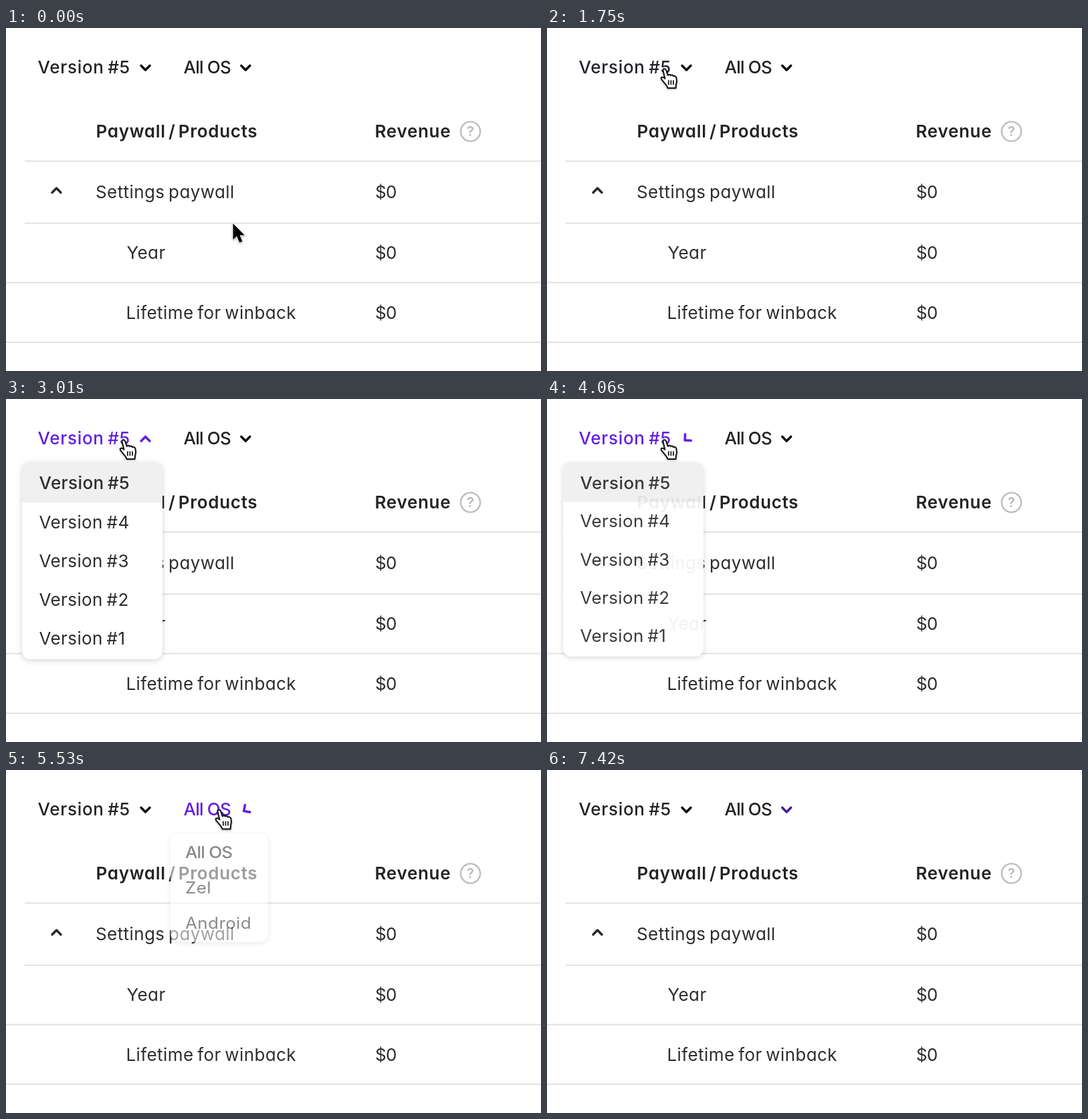
These frames come from a looping animation (800 by 514 pixels, 7.49 s). An HTML page:

```html
<!DOCTYPE html>
<html lang="en">
<head>
<meta charset="utf-8">
<title>Paywall filters</title>
<style>
  html, body { margin: 0; width: 100%; height: 100%; overflow: hidden; background: #fff; }
  svg { display: block; width: 100%; height: 100%; }
  text {
    font: 400 26px Inter, "Open Sans", sans-serif; font-feature-settings: "cv11";
    letter-spacing: .4px; word-spacing: -2px; fill: #2d2d2d; white-space: pre;
  }
  .medium { font-weight: 500; }
  .head { font-weight: 600; fill: #232323; word-spacing: -3px; }
  .title { letter-spacing: .7px; }
  .tight { letter-spacing: -.8px; word-spacing: 0; }
  .rule { stroke: #e2e2e2; stroke-width: 1.8; }
  .chevron { fill: none; stroke: #111; stroke-width: 3.6; stroke-linecap: round; stroke-linejoin: round; }
  .panel { fill: #fff; filter: drop-shadow(0 2px 4px rgba(0, 0, 0, .17)); }
  .cursor { filter: drop-shadow(0 1.5px 1.5px rgba(0, 0, 0, .35)); }
</style>
</head>
<body>
<svg id="stage" viewBox="0 0 800 514"></svg>
<script>
const NS = "http://www.w3.org/2000/svg";
const LOOP = 7490, STEP = 70, HOLD = 280;
const DARK = [34, 34, 34], BLACK = [14, 14, 14], PURPLE = [98, 32, 224];
const ROW = 58.2, MENU_TOP = 95, PAD = 2;
const stage = document.getElementById("stage");

function add(tag, attrs = {}, parent = stage) {
  const node = document.createElementNS(NS, tag);
  for (const key in attrs) node.setAttribute(key, attrs[key]);
  parent.append(node);
  return node;
}

function label(str, x, y, cls = "", parent = stage) {
  const node = add("text", { x, y, class: cls }, parent);
  node.textContent = str;
  return node;
}

const rule = (x, y) => add("line", { x1: x, x2: 800, y1: y, y2: y, class: "rule" });
const chevron = () => add("path", { d: "M-6.4-3.3L0 3.2L6.4-3.3", class: "chevron" });

function menu(x, width, items, shade) {
  const g = add("g");
  const height = items.length * ROW + 2 * PAD;
  add("rect", { x, y: 0, width, height, rx: 12, class: "panel" }, g);
  if (shade) {
    add("path", { d: `M${x} ${PAD + ROW}V12q0-12 12-12h${width - 24}q12 0 12 12V${PAD + ROW}z`, fill: "#f0f0f0" }, g);
  }
  items.forEach((item, i) => {
    const cls = (i ? "" : "medium ") + (/OS/.test(item) ? "tight" : "");
    label(item, x + (shade ? 25.5 : 22), PAD + ROW * (i + .5) + 9.2, cls, g);
  });
  return g;
}

// Motion helpers
const clamp = v => Math.min(1, Math.max(0, v));
const span = (t, from, to) => clamp((t - from) / (to - from));
const lerp = (a, b, k) => a + (b - a) * k;
const mix = (a, b, k) => `rgb(${a.map((v, i) => Math.round(lerp(v, b[i], k)))})`;

function bezier(x1, y1, x2, y2) {
  const at = (a, b, u) => 3 * (1 - u) ** 2 * u * a + 3 * (1 - u) * u * u * b + u ** 3;
  return x => {
    if (x <= 0 || x >= 1) return clamp(x);
    let lo = 0, hi = 1;
    for (let i = 0; i < 24; i++) {
      const mid = (lo + hi) / 2;
      if (at(x1, x2, mid) < x) lo = mid; else hi = mid;
    }
    return at(y1, y2, lo);
  };
}

const easeInOut = bezier(.42, 0, .58, 1);
const easeOut = bezier(0, 0, .58, 1);
const slideIn = bezier(.23, 1, .32, 1);
const slideOut = bezier(.755, .05, .855, .06);

// Table
[[28, 199.5], [28, 292.5], [0, 381.5], [0, 471]].forEach(([x, y]) => rule(x, y));
label("Paywall / Products", 134.5, 164, "head title");
label("Revenue", 551.5, 164, "head title");
add("circle", { cx: 694.5, cy: 155, r: 14.6, fill: "none", stroke: "#bdbdbd", "stroke-width": 2.4 });
const help = label("?", 694.7, 162.3, "head");
help.setAttribute("text-anchor", "middle");
help.setAttribute("style", "font-size:20px;fill:#b8b8b8");
label("Settings paywall", 134, 255.3);
label("Year", 180.5, 346.3);
label("Lifetime for winback", 179.5, 435.6);
[255.3, 346.3, 435.6].forEach(y => label("$0", 552, y, "tight"));
const expander = chevron();
expander.setAttribute("transform", "translate(75.5 243.3) rotate(180)");
expander.style.stroke = "#2a2a2a";

// Filters; times in ms
const filters = [
  {
    text: label("Version #5", 47.5, 67.6, "medium title"), icon: chevron(), x: 208.5,
    menu: menu(24, 210, [5, 4, 3, 2, 1].map(n => "Version #" + n), true),
    enter: 1740, leave: 4250, textFade: 200, iconFade: 200, turn: 2437, open: 2465, close: 3950
  },
  {
    text: label("All OS", 265.5, 67.6, "medium tight"), icon: chevron(), x: 358.3,
    menu: menu(246, 146, ["All OS", "Zel", "Android"], false),
    enter: 4410, leave: 7330, textFade: 80, iconFade: 280, turn: 5490, open: 5500, close: 6276
  }
];

// Cursors, both with the hot spot at 0,0
const arrow = add("path", {
  d: "M0 0V24.2L5.6 19L9.6 28.6L14 26.7L10 17.4H17.4Z",
  fill: "#000", stroke: "#fff", "stroke-width": 1.6, "paint-order": "stroke", class: "cursor"
});
const hand = add("g", { class: "cursor" });
add("path", {
  d: "M-1.6 2C-1.8-.6 2-.8 3 1.8L5.8 9.6C6.8 7.8 9.2 8 9.9 9.8C11.2 8.6 13.2 9 13.8 10.8C15.6 9.8 17.8 10.8 18.4 13.2C19.4 17 19.2 20 18 23.4L17.6 28.6H5.6C5 26.4 2.6 23.2-.4 19.8C-2 17.6-4.6 15.8-4.4 13.6C-4 11.8-1.2 12 1.4 14.6Z",
  fill: "#fff", stroke: "#111", "stroke-width": 2, "stroke-linejoin": "round"
}, hand);
add("path", { d: "M6.8 17V23.6M10.4 17V23.6M14 17V23.6", stroke: "#111", "stroke-width": 1.7, fill: "none" }, hand);

// [start, end, x, y]: the pointer eases to each place in turn
const moves = [
  [270, 840, 191.5, 94],
  [1000, 1190, 175, 61.3],
  [4190, 4480, 318, 59.8],
  [7040, 7360, 377, 37]
];

function drawFilter(f, t) {
  const hover = fade => span(t, f.enter, f.enter + fade) * (1 - span(t, f.leave, f.leave + fade));
  f.text.style.fill = mix(DARK, PURPLE, hover(f.textFade));
  f.icon.style.stroke = mix(BLACK, PURPLE, hover(f.iconFade));
  const turn = easeOut(span(t, f.turn, f.turn + 200)) - easeOut(span(t, f.close, f.close + 200));
  f.icon.setAttribute("transform", `translate(${f.x} 59.7) rotate(${180 * turn})`);
  const shown = slideIn(span(t, f.open, f.open + 200)) - slideOut(span(t, f.close, f.close + 200));
  f.menu.setAttribute("opacity", shown);
  f.menu.setAttribute("transform", `translate(0 ${MENU_TOP}) scale(1 ${.8 + .2 * shown})`);
  f.menu.style.display = shown > 0 ? "" : "none";
}

function drawCursor(t) {
  let x = 339.5, y = 293;
  for (const [from, to, toX, toY] of moves) {
    const k = easeInOut(span(t, from, to));
    x = lerp(x, toX, k);
    y = lerp(y, toY, k);
  }
  const pointing = t >= 1330 && t < 7330;
  hand.style.display = pointing ? "" : "none";
  arrow.style.display = !pointing && t < 7400 ? "" : "none";
  (pointing ? hand : arrow).setAttribute("transform", `translate(${x} ${y})`);
}

function draw(now) {
  const raw = now % LOOP;
  const t = raw < HOLD ? 0 : Math.floor(raw / STEP) * STEP;
  filters.forEach(f => drawFilter(f, t));
  drawCursor(t);
}

const start = performance.now();
function tick() {
  draw(performance.now() - start);
  requestAnimationFrame(tick);
}
tick();
</script>
</body>
</html>
```
